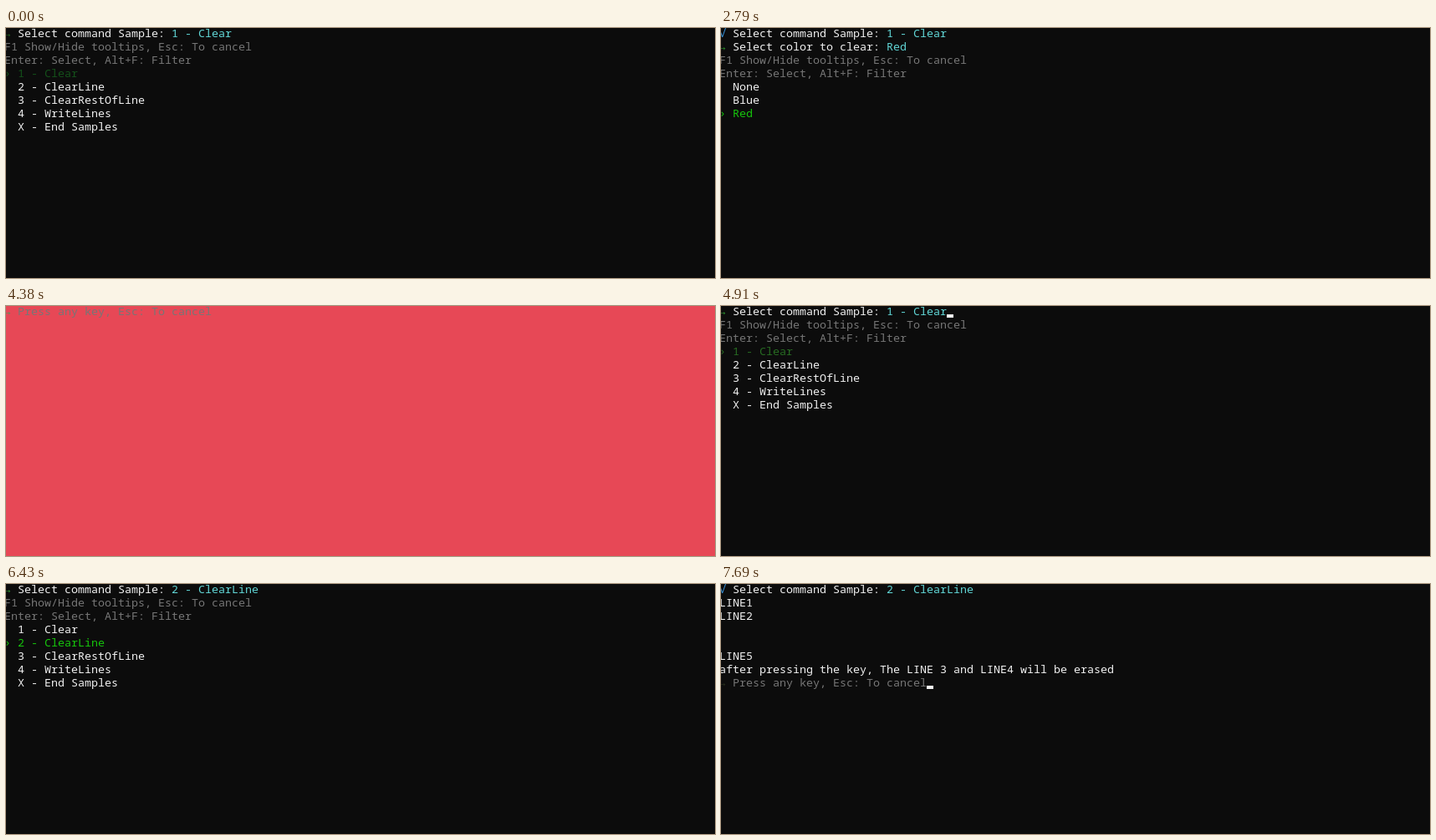
Recreate the animation shown at these times as an HTML page with a canvas. Size 848 px wide and 300 px high, loop 8 s.

```html
<!DOCTYPE html>
<html lang="en">
<head>
<meta charset="utf-8">
<title>Console command samples</title>
<style>
  html, body { margin: 0; width: 100%; height: 100%; overflow: hidden; background: #0c0c0c; }
  canvas { display: block; }
</style>
</head>
<body>
<canvas id="stage" width="848" height="300"></canvas>
<script>
const LOOP = 8000, CELL = 8, ROW = 16, LEFT = -2, BASELINE = 11;
const BLACK = '#0c0c0c', RED = '#e74856', WHITE = '#f2f2f2', GREY = '#767676';
const CYAN = '#61d6d6', BLUE = '#3a96dd', GREEN = '#16c60c';

const ctx = document.getElementById('stage').getContext('2d', { alpha: false });

// A line is a list of [text, colour] spans laid on the character grid.
const plain = text => [[text, WHITE]];
const answered = (question, answer) =>
  [['√ ', BLUE], [question + ': ', WHITE], [answer, CYAN]];
const asking = (question, answer, arrow) =>
  [['→ ', arrow], [question + ': ', WHITE], [answer, CYAN]];
const anyKey = arrow => [['→ ', arrow], ['Press any key, Esc: To cancel', GREY]];

const tooltips = [
  [['F1 Show/Hide tooltips, Esc: To cancel', GREY]],
  [['Enter: Select, Alt+F: Filter', GREY]]
];
const commands = ['1 - Clear', '2 - ClearLine', '3 - ClearRestOfLine', '4 - WriteLines', 'X - End Samples'];
const colors = ['None', 'Blue', 'Red'];
const COMMAND = 'Select command Sample', COLOR = 'Select color to clear';

function menu(question, items, chosen, arrow, highlight) {
  return [
    asking(question, items[chosen], arrow),
    ...tooltips,
    ...items.map((item, i) => i === chosen ? [['› ' + item, highlight]] : plain('  ' + item))
  ];
}

const commandMenu = (chosen, arrow, highlight) =>
  ({ lines: menu(COMMAND, commands, chosen, arrow, highlight), cursorRow: 0 });

const colorMenu = chosen => ({
  lines: [answered(COMMAND, commands[0]), ...menu(COLOR, colors, chosen, '#2c9a2c', GREEN)],
  cursorRow: 1
});

const clearLine = erased => ({
  lines: [
    answered(COMMAND, commands[1]),
    ...[1, 2, 3, 4, 5].map(n => plain(erased && (n === 3 || n === 4) ? '' : 'LINE' + n)),
    plain('after pressing the key, The LINE 3 and LINE4 will be erased'),
    anyKey('#2b3320')
  ],
  cursorRow: 7
});

const redScreen = {
  lines: [anyKey('#4f9a58')], cursorRow: 0, background: RED, cursor: '#27b374'
};

const screens = [
  [0, commandMenu(0, '#1f6420', '#14501a')],
  [1660, colorMenu(0)],
  [2390, colorMenu(1)],
  [2660, colorMenu(2)],
  [3120, redScreen],
  [4910, commandMenu(0, '#2f9a30', '#276b22')],
  [5900, commandMenu(1, '#2f9a30', GREEN)],
  [6560, clearLine(false)],
  [7690, clearLine(true)]
];

// The cursor starts hidden and flips at each of these times.
const blinks = [1190, 1730, 2260, 2790, 3120, 3320, 3850, 4380, 4910, 5440, 5970, 6430, 6560, 6960, 7490];

function drawLine(spans, row) {
  let column = 0;
  for (const [text, color] of spans) {
    ctx.fillStyle = color;
    for (const char of text) {
      ctx.fillText(char, LEFT + column++ * CELL, BASELINE + row * ROW);
    }
  }
  return column;
}

function draw(time) {
  const screen = screens.findLast(([start]) => start <= time)[1];
  ctx.fillStyle = screen.background || BLACK;
  ctx.fillRect(0, 0, 848, 300);
  const lengths = screen.lines.map(drawLine);
  if (blinks.filter(t => t <= time).length % 2) {
    ctx.fillStyle = screen.cursor || WHITE;
    ctx.fillRect(LEFT + lengths[screen.cursorRow] * CELL, 10 + screen.cursorRow * ROW, CELL, 4);
  }
}

ctx.font = '13.333px "Noto Sans Mono", "DejaVu Sans Mono", monospace';
const begin = performance.now();
function tick() {
  draw((performance.now() - begin) % LOOP);
  requestAnimationFrame(tick);
}
tick();
</script>
</body>
</html>
```
